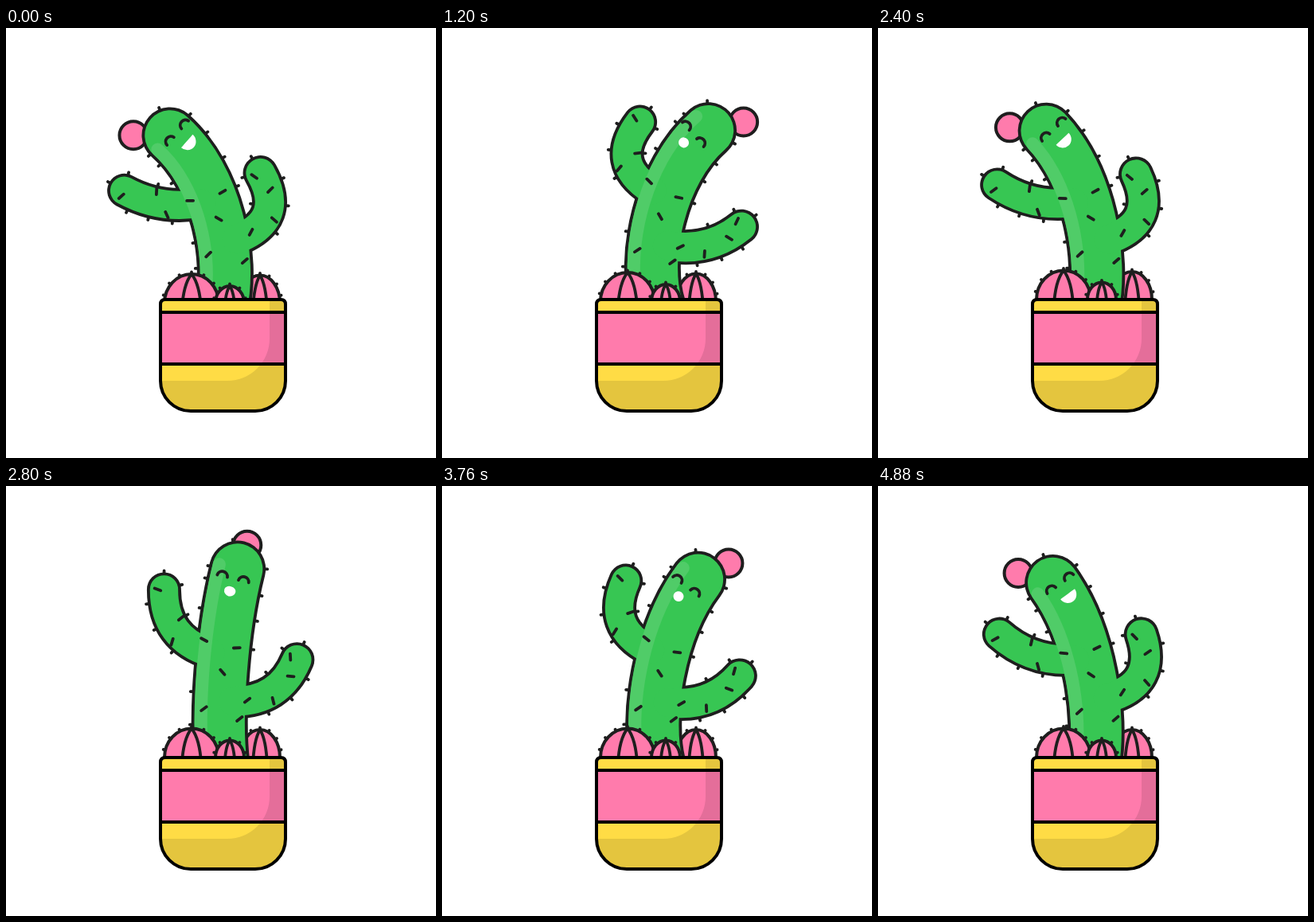
These frames come from a looping animation (540 px wide and 540 px high, 4.96 s). An HTML page:

```html
<!DOCTYPE html>
<html>
<head>
<meta charset="utf-8">
<title>Dancing cactus</title>
<style>
html, body { margin: 0; width: 100%; height: 100%; overflow: hidden; background: #fff; }
svg { display: block; width: 100vw; height: 100vh; }
path { fill: none; stroke-linecap: round; stroke-linejoin: round; }
.ink { stroke: #1e1e1e; }
.leaf { stroke: #37c653; }
.pink { fill: #ff7bac; stroke: #1e1e1e; stroke-width: 4; }
.line { stroke: #1e1e1e; stroke-width: 3.8; }
</style>
</head>
<body>
<svg viewBox="0 0 540 540">
  <defs>
    <clipPath id="potClip"><path id="potShape" d="M200 341H345Q351 341 351 347V443A38 38 0 0 1 313 481H232A38 38 0 0 1 194 443V347Q194 341 200 341Z"/></clipPath>
  </defs>
  <g id="back"></g>
  <circle id="ball" class="pink" r="17.5"/>
  <path id="bodyInk" class="ink" stroke-width="71"/>
  <path id="leftInk" class="ink" stroke-width="43"/>
  <path id="rightInk" class="ink" stroke-width="44"/>
  <path id="bodyLeaf" class="leaf" stroke-width="63.4"/>
  <path id="leftLeaf" class="leaf" stroke-width="35.4"/>
  <path id="rightLeaf" class="leaf" stroke-width="36.4"/>
  <path id="shine" stroke="#50cc68" stroke-width="16"/>
  <path id="spines" class="line"/>
  <g id="face">
    <path class="line" d="M-20.3 3.5A6.6 6.6 0 0 1 -7.2 3.5M7.2 3.5A6.6 6.6 0 0 1 20.3 3.5"/>
    <path id="mouth" style="fill:#fff"/>
  </g>
  <g id="front"></g>
  <g clip-path="url(#potClip)">
    <rect x="190" y="338" width="165" height="147" fill="#ffdc45"/>
    <rect x="190" y="357" width="165" height="65" fill="#ff7bac"/>
    <path style="fill:#000;fill-opacity:.105" d="M331 335H360V490H190V443H278A53 53 0 0 0 331 390Z"/>
  </g>
  <path stroke="#000" stroke-width="4" d="M194 357H351M194 422H351"/>
  <use href="#potShape" stroke="#000" stroke-width="4"/>
</svg>
<script>
const LOOP = 4960, CYCLE = 2240, STEP = 80, RAD = Math.PI / 180;
const $ = id => document.getElementById(id);
const mix = (a, b, k) => a + (b - a) * k;
const clamp = k => Math.max(0, Math.min(1, k));
const sin = a => Math.sin(a * RAD), cos = a => Math.cos(a * RAD);
const fix = p => p[0].toFixed(2) + ' ' + p[1].toFixed(2);
const polar = (c, r, a) => [c[0] + r * sin(a), c[1] - r * cos(a)];   // a: clockwise from up

// Lean in degrees over one sway; the second sway swings back a little later.
const leanKeys = late => [
  [-160, -46], [0, -48.5], [160, -43.5], [400, -36], [560, 14], [700, 37], [960, 48], [1080, 49.5],
  [1200, 49], [1520, late ? 37 : 34], [1680, late ? 8 : -2], [1840, -38], [2080, -46], [2240, -48.5], [2400, -43.5]
];

function curveAt(keys, t) {
  const slope = i => (keys[i + 1][1] - keys[i][1]) / (keys[i + 1][0] - keys[i][0]);
  const tangent = i => {
    const a = slope(i - 1), b = slope(i);
    return a * b <= 0 ? 0 : 2 * a * b / (a + b);
  };
  let i = 1;
  while (i < keys.length - 3 && t >= keys[i + 1][0]) i++;
  const [t0, a] = keys[i], [t1, b] = keys[i + 1], w = t1 - t0, k = (t - t0) / w;
  return a + (b - a) * k * k * (3 - 2 * k)
    + w * k * (1 - k) * ((1 - k) * tangent(i) - k * tangent(i + 1));
}

// Point and heading on a Bezier curve given by 3 or 4 points.
function bezier(pts, t) {
  let p = pts, last = pts;
  while (p.length > 1) {
    last = p;
    p = p.slice(1).map((q, i) => [mix(p[i][0], q[0], t), mix(p[i][1], q[1], t)]);
  }
  return { p: p[0], dir: Math.atan2(last[1][0] - last[0][0], last[0][1] - last[1][1]) / RAD };
}
function beside(pts, t, v) {
  const { p, dir } = bezier(pts, t);
  return { p: polar(p, v, dir + 90), dir };
}
const pathOf = p => 'M' + fix(p[0]) + (p.length > 3 ? 'C' : 'Q') + p.slice(1).map(fix).join(' ');

const dash = (c, len, a) => 'M' + fix(polar(c, -len / 2, a)) + 'L' + fix(polar(c, len / 2, a));
// Dashes on the skin: place along, place across, angle to the curve.
const inner = (pts, list) => list.map(([t, v, a]) => {
  const s = beside(pts, t, v);
  return dash(s.p, 8, s.dir + a);
}).join('');
const edge = (pts, list, r) => list.map(([t, side]) => {
  const s = beside(pts, t, side * r);
  return dash(s.p, 3, s.dir + 90);
}).join('');
const around = (c, r, angles) => angles.map(a => dash(polar(c, r, a), 3, a)).join('');

// Arm that bulges to one side of the line from root to tip.
function arm(root, tip, bulge) {
  const dx = tip[0] - root[0], dy = tip[1] - root[1], d = Math.hypot(dx, dy);
  return [root, [mix(root[0], tip[0], .5) - dy / d * bulge, mix(root[1], tip[1], .5) + dx / d * bulge], tip];
}

function smallCactus(x, rx, ry, gap) {
  const top = 341 - ry, q = rx * .36;
  let spikes = '';
  for (let a = -75; a <= 75; a += gap) {
    spikes += dash([x + (rx + 1.5) * sin(a), 341 - (ry + 1.5) * cos(a)], 2, a);
  }
  return `<path class="pink" d="M${x - rx} 352V341A${rx} ${ry} 0 0 1 ${x + rx} 341V352Z"/>
    <path class="line" d="M${x} ${top}Q${x - q * .85} ${top + ry * .35} ${x - q} 350M${x} ${top}Q${x + q * .85} ${top + ry * .35} ${x + q} 350${spikes}"/>`;
}
$('back').innerHTML = smallCactus(319, 25, 35, 25);
$('front').innerHTML = smallCactus(233, 34, 36.5, 25) + smallCactus(281, 18, 21.5, 37.5);

function draw(time) {
  const t = Math.floor(time / STEP) * STEP % LOOP;
  const lean = curveAt(leanKeys(t >= CYCLE), t % CYCLE);
  const k = (lean + 49) / 98;

  const head = [270 + 85.5 * sin(lean), 102.5 + 86 * (1 - cos(lean)) - .07 * lean];
  const body = [[271, 350], [268.5 - .34 * lean, 290], polar(head, -80, lean), head];
  const left = arm([mix(245, 264, k), mix(220, 204, k)], polar([245, 215], 97, .88 * lean - 41), mix(-17, -48, k));
  const right = arm([mix(290, 283, k), mix(265, 273, k)], polar([296, 259], 80.5, .68 * lean + 50), mix(51, 22, k));

  // Paler strip along the left side.
  const strip = [];
  for (let i = 0; i <= 20; i++) strip.push(beside(body, i / 20, -23.5).p);
  $('shine').setAttribute('d', 'M' + strip.map(fix).join('L'));

  for (const [name, pts] of [['body', body], ['left', left], ['right', right]]) {
    $(name + 'Ink').setAttribute('d', pathOf(pts));
    $(name + 'Leaf').setAttribute('d', pathOf(pts));
  }

  const ballDir = 93 * sin(1.3 * lean) - 7;
  const ball = polar(head, 24 + 22 * Math.abs(sin(ballDir)), ballDir);
  $('ball').setAttribute('cx', ball[0]);
  $('ball').setAttribute('cy', ball[1]);

  const leftDir = bezier(left, 1).dir, rightDir = bezier(right, 1).dir;
  $('spines').setAttribute('d',
    inner(body, [[.64, -26, 112], [.62, 16, 81], [.5, 1, 135], [.32, -20, 52], [.27, 25, 52]]) +
    edge(body, [[.24, -1], [.4, -1], [.78, -1], [.92, -1], [.62, 1], [.76, 1], [.89, 1]], 36) +
    around(head, 36, [-12 + .2 * lean, 80 + .75 * lean, -95 + .8 * lean]) +
    inner(left, [[1, -8, -70], [.42, -13, 60], [.6, 14, 80]]) +
    edge(left, [[.35, -1], [.62, -1], [.87, -1], [.6, 1]], 22) +
    around(left[2], 22, [leftDir, leftDir + 75]) +
    inner(right, [[1, -9, -26], [.8, 3, 60], [.45, 11, 105], [.16, 0, -30]]) +
    edge(right, [[.35, 1], [.62, 1], [.87, 1], [.6, -1]], 22.5) +
    around(right[2], 22.5, [rightDir, rightDir - 75]));

  $('face').setAttribute('transform',
    `translate(${fix(head)}) rotate(${lean.toFixed(2)}) translate(${-.18 * lean} ${8 + .13 * lean})`);
  const m = clamp((lean + 20) / 40), w = mix(11, 6.6, m), up = mix(.01, 6.4, m), low = mix(11.5, 6.4, m);
  $('mouth').setAttribute('d', `M${-w} 19A${w} ${up} 0 0 1 ${w} 19A${w} ${low} 0 0 1 ${-w} 19Z`);

  const sink = 4.5 * (1 - clamp(t / 1800) ** 2);
  $('back').setAttribute('transform', `translate(0 ${sink})`);
  $('front').setAttribute('transform', `translate(0 ${sink})`);
}

const start = performance.now();
function tick() {
  draw(Math.max(0, performance.now() - start) % LOOP);
  requestAnimationFrame(tick);
}
draw(0);
requestAnimationFrame(tick);
</script>
</body>
</html>
```
